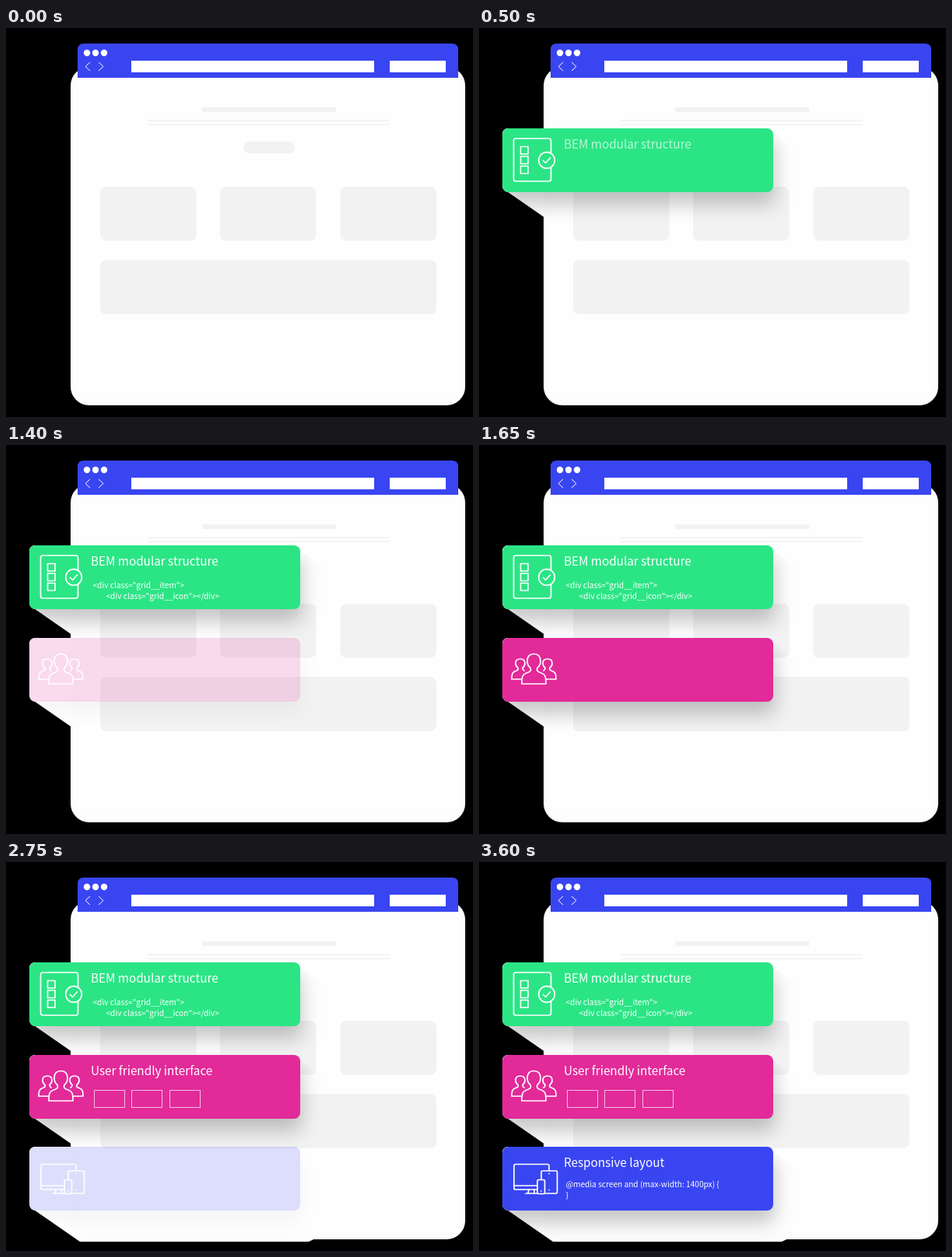
These frames come from a looping animation (600 by 500 pixels, 4600 ms). An HTML page:

```html
<!DOCTYPE html>
<html lang="en">
<head>
<meta charset="utf-8">
<title>Feature cards</title>
<style>
  html, body { margin: 0; width: 100%; height: 100%; overflow: hidden; background: #000; }
  svg { display: block; }
  text { font-family: "Noto Sans CJK JP", "Noto Sans CJK SC", "Noto Sans CJK", "Noto Sans", sans-serif; fill: #fff; }
  .title { font-size: 15.25px; }
  .code { font-size: 10.15px; }
  .icon { fill: none; stroke: #fff; stroke-width: 1.7; stroke-linejoin: round; stroke-linecap: round; }
  .shade { filter: blur(12px); }
</style>
</head>
<body>
<svg width="600" height="500" viewBox="0 0 600 500">
  <defs>
    <path id="cast" d="M0 74V8Q0 0 8 0H340L384 33V110L359 122H65L3 79Z"/>
    <clipPath id="castClip"><use href="#cast"/></clipPath>
  </defs>
  <g id="mattes"></g>
  <rect x="83" y="50" width="507" height="435" rx="24" fill="#fdfdfd"/>
  <rect x="92" y="64" width="489" height="412" fill="#fefefe"/>
  <path d="M92 64V28Q92 20 100 20H573Q581 20 581 28V64Z" fill="#3945f1"/>
  <g fill="#fff">
    <circle cx="104" cy="32" r="4.2"/>
    <circle cx="115" cy="32" r="4.2"/>
    <circle cx="126" cy="32" r="4.2"/>
    <rect x="161" y="42" width="312" height="15"/>
    <rect x="493" y="42" width="72" height="15"/>
  </g>
  <path d="M108 44L102 49.5L108 55M119 44L125 49.5L119 55" fill="none" stroke="#fff"/>
  <g fill="#f2f2f2">
    <rect x="252" y="102" width="172" height="6"/>
    <rect x="182" y="118.5" width="311" height="1.5"/>
    <rect x="182" y="123.5" width="311" height="1.5"/>
    <rect x="305" y="146" width="66" height="15" rx="7.5"/>
    <rect x="121" y="204" width="123.5" height="69.5" rx="8"/>
    <rect x="275" y="204" width="123.5" height="69.5" rx="8"/>
    <rect x="429.5" y="204" width="123.5" height="69.5" rx="8"/>
    <rect x="121" y="298" width="432" height="70" rx="8"/>
  </g>
  <g id="cards"></g>
</svg>
<script>
const LOOP = 4600, STEP = 50, FADE = 6;

const code = (x, y, s) =>
  `<text class="code" x="${x}" y="${y}">${s.replace(/</g, '&lt;')}</text>`;
const box = (x, y, w, h, more = '') =>
  `<rect x="${x}" y="${y}" width="${w}" height="${h}" ${more}/>`;

const sidePerson = 'M55 301H42C42 294 43 292 47 290.5C50 289.5 51 288.5 50 286.5' +
  'C48 285 47 283 47 280.5C47 276.5 49.5 275 53 275S59 276.5 59 280.5C59 283 58 285 56 286.5C56 288 56 289 58 290';

// Icon and detail coordinates are on the stage.
const cards = [
  {
    start: 50, top: 129, color: '#2be585', title: 'BEM modular structure',
    icon: box(44.5, 142, 48, 55, 'rx="3"') +
      [152.5, 165, 177.5].map(y => box(53.5, y, 9.5, 9.5)).join('') +
      '<circle cx="87" cy="170" r="10.3" fill="#2be585"/><path d="M82.5 170.5L85.5 173.5L91.5 167"/>',
    detail: code(111.5, 184, '<div class="grid__item">') +
      code(128.5, 198, '<div class="grid__icon"></div>')
  },
  {
    start: 1400, top: 248, color: '#e22a99', title: 'User friendly interface',
    icon: `<path d="${sidePerson}"/><path d="${sidePerson}" transform="matrix(-1 0 0 1 141 0)"/>` +
      '<path fill="#e22a99" d="M55 307C55 297 56 295 61 293C66 291.5 67.5 290 66 286.5C63 284 62 281 62 278' +
      'C62 271 66 268.5 70.5 268.5S79 271 79 278C79 281 78 284 75 286.5C73.5 290 75 291.5 80 293C85 295 86 297 86 307Z"/>',
    detail: '<g fill="none" stroke="#fff" stroke-opacity=".7">' +
      [113.5, 161.5, 210.5].map(x => box(x, 293.5, 39, 22)).join('') + '</g>'
  },
  {
    start: 2750, top: 366, color: '#3945f1', title: 'Responsive layout',
    icon: box(45, 388.5, 45, 32.5, 'rx="2"') +
      '<path d="M45 416H90M64 421L63 425.5M71 421V425.5M60 426H75"/><g fill="#3945f1">' +
      box(80, 397, 20.5, 29, 'rx="1.5"') + box(75, 408.5, 9.5, 18, 'rx="1.5"') +
      '</g><path d="M90 400.5H90.2M90 421.5H90.2M79.7 423H79.9"/>',
    detail: code(111.5, 418, '@media screen and (max-width: 1400px) {') + code(111.5, 432, '}')
  }
];

const mattes = document.getElementById('mattes');
const layer = document.getElementById('cards');
mattes.innerHTML = cards.map(c =>
  `<g transform="translate(30 ${c.top})" fill="#fff"><use href="#cast"/>${box(0, 0, 348, 82, 'rx="8"')}</g>`).join('');
layer.innerHTML = cards.map(c => `<g>
  <g transform="translate(30 ${c.top})">
    <g clip-path="url(#castClip)">${box(2, 16, 348, 82, 'class="shade" rx="8" fill-opacity=".22"')}</g>
    ${box(0, 0, 348, 82, `rx="8" fill="${c.color}"`)}
  </g>
  <g class="icon">${c.icon}</g>
  <text class="title" x="109" y="${c.top + 26}">${c.title}</text>
  <g class="detail">${c.detail}</g>
</g>`).join('');

cards.forEach((c, i) => {
  const group = layer.children[i];
  c.matte = mattes.children[i];
  c.parts = [group, group.querySelector('.title'), group.querySelector('.detail')];
});

// Card, title and detail fade in one after another, in whole steps.
function draw() {
  const time = performance.now() % LOOP;
  for (const c of cards) {
    const step = Math.floor((time - c.start) / STEP) + 1;
    c.matte.setAttribute('opacity', step > 0 ? 1 : 0);
    c.parts.forEach((part, i) =>
      part.setAttribute('opacity', Math.min(1, Math.max(0, step / FADE - i))));
  }
  requestAnimationFrame(draw);
}
draw();
</script>
</body>
</html>
```
